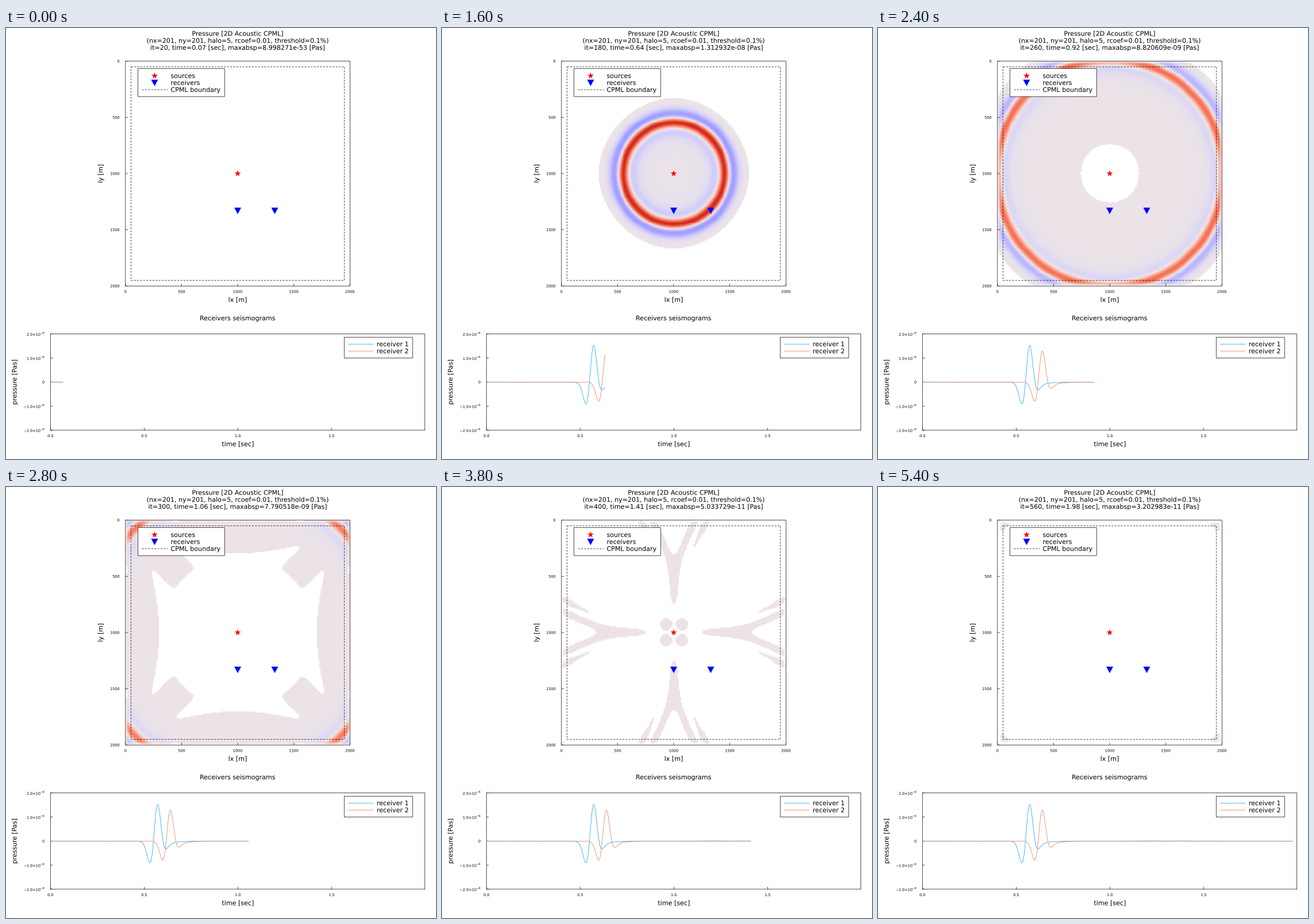
Recreate the animation shown at these times as a matplotlib script. Size 748 px wide and 749 px high, loop 5.6 s.

```python
import numpy as np
import matplotlib.pyplot as plt
from matplotlib.animation import FuncAnimation
from matplotlib.colors import LinearSegmentedColormap
from matplotlib.patches import PathPatch, Polygon, Rectangle
from matplotlib.textpath import TextPath
from matplotlib.transforms import Affine2D

W, H, DPI = 748, 749, 100
PX = 72 / DPI  # points per pixel
plt.rcParams["font.family"] = "DejaVu Sans"

# ---- acoustic wave simulation with absorbing layers ----
N, HALO, DX, VEL = 201, 5, 10.0, 2000.0
F0, T0, RCOEF = 10.0, 0.4, 0.01
DT = DX / (VEL * np.sqrt(2))
STEP, FRAMES = 20, 28
PMAX = 2e-8
MID, REC = 100, 133


def ricker(t):
    a2 = (np.pi * F0 * (t - T0)) ** 2
    return (1 - 2 * a2) * np.exp(-a2)


def absorb(pos):
    """Recursive CPML coefficients (a, b) at grid positions."""
    depth = np.clip(1 - np.minimum(pos, N - 1 - pos) / HALO, 0, 1)
    d = -3 * VEL * np.log(RCOEF) / (2 * HALO * DX) * depth ** 2
    alpha = np.pi * F0 * (1 - depth)
    b = np.exp(-(d + alpha) * DT)
    return (d * (b - 1) / (d + alpha))[:, None], b[:, None]


def simulate():
    a_half, b_half = absorb(np.arange(N - 1) + 0.5)
    a_in, b_in = absorb(np.arange(1, N - 1))
    p, old = np.zeros((N, N)), np.zeros((N, N))
    psi, xi = np.zeros((N - 1, N)), np.zeros((N - 2, N))
    fields, traces = [], []
    for it in range(STEP * FRAMES):
        grad = np.diff(p, axis=0) / DX
        psi = b_half * psi + a_half * grad
        lap = np.diff(grad + psi, axis=0) / DX
        xi = b_in * xi + a_in * lap
        acc = (lap + xi)[:, 1:-1]
        new = np.zeros((N, N))
        # the field is symmetric, so the y part is the transposed x part
        new[1:-1, 1:-1] = (2 * p - old)[1:-1, 1:-1] + (VEL * DT) ** 2 * (acc + acc.T)
        new[MID, MID] += DT ** 2 * ricker(it * DT) / DX ** 2
        old, p = p, new
        traces.append((p[REC, MID], p[REC, REC]))
        if (it + 1) % STEP == 0:
            fields.append(p)
    return fields, np.array(traces)


fields, traces = simulate()
times = np.arange(len(traces)) * DT

# ---- stage in pixel coordinates ----
fig = plt.figure(figsize=(W / DPI, H / DPI), dpi=DPI, facecolor="white")
ax = fig.add_axes([0, 0, 1, 1])
ax.set_xlim(0, W)
ax.set_ylim(H, 0)
ax.axis("off")

BIG, SMALL, TINY = 11.1, 6.5, 4.7
THIN = 0.7
L, R, T, B = 207.8, 598.3, 57.6, 448.3      # map frame
SL, SR, ST, SB = 77.3, 728.7, 531.7, 698.9  # seismogram frame
CX, ZERO = (L + R) / 2, (ST + SB) / 2


def mx(m):
    return L + m * (R - L) / 2000


def my(m):
    return T + m * (B - T) / 2000


def sx(t):
    return SL + t * (SR - SL) / (565 * DT)


def sy(p):
    return ZERO - p * (SB - ST) / (2 * PMAX)


def glyphs(x, y, s, size=BIG, ha="center", rot=0):
    """Unhinted text outline with its baseline at (x, y)."""
    path = TextPath((0, 0), s, size=size)
    ink = path.get_extents()
    dx = {"left": 0, "center": (ink.x0 + ink.x1) / 2, "right": ink.x1}[ha]
    place = Affine2D().translate(-dx, 0).scale(1, -1).rotate_deg(-rot).translate(x, y)
    return place.transform_path(path)


def label(*args, **kw):
    return ax.add_patch(PathPatch(glyphs(*args, **kw), fc="black", ec="none",
                                  snap=False, zorder=8))


def box(x0, y0, x1, y1, z=4, **kw):
    style = dict(fc="none", ec="black", lw=THIN * PX, snap=False) | kw
    return ax.add_patch(Rectangle((x0, y0), x1 - x0, y1 - y0, zorder=z, **style))


def line(xs, ys, color="black", z=4, **kw):
    return ax.plot(xs, ys, color=color, lw=THIN * PX, zorder=z, snap=False,
                   solid_capstyle="butt", dash_capstyle="butt", **kw)[0]


def shape(points, color, z):
    ax.add_patch(Polygon(points, fc=color, ec="none", snap=False, zorder=z))


def star(x, y, r=5.7, z=6):
    ang = np.arange(10) * np.pi / 5
    rad = np.where(np.arange(10) % 2, 0.4 * r, r)
    shape(np.c_[x + rad * np.sin(ang), y - rad * np.cos(ang)], "red", z)


def triangle(x, y, r=6, z=6):
    shape([(x - r, y - 0.87 * r), (x + r, y - 0.87 * r), (x, y + r)], "blue", z)


DASH = dict(ls=(0, (4.6, 3.1)))

# pressure map
stops = [(-1, "#172975"), (-0.73, "#4842e8"), (-0.37, "#a09bff"),
         (-0.2, "#c8c4fd"), (-0.08, "#dfdaf3"), (0, "#ede4e8"),
         (0.08, "#f6d7d0"), (0.22, "#faaf9b"), (0.44, "#f47058"),
         (0.55, "#e44c38"), (0.656, "#cf2a20"), (0.73, "#ba1218"), (1, "#680013")]
cmap = LinearSegmentedColormap.from_list("bwr_lab", [((v + 1) / 2, c) for v, c in stops])
heat = ax.imshow(np.full((N, N), np.nan), cmap=cmap, vmin=-PMAX, vmax=PMAX,
                 extent=(mx(-5), mx(2005), my(2005), my(-5)),
                 interpolation="nearest", aspect="auto", zorder=1)
heat.set_clip_path(Rectangle((L, T), R - L, B - T, transform=ax.transData))

box(L, T, R, B)
box(mx(50), my(50), mx(1950), my(1950), z=3, **DASH)
for m in range(0, 2001, 500):
    line([mx(m)] * 2, [B, B - 4])
    line([L, L + 4], [my(m)] * 2)
    label(mx(m), 460.4, str(m), SMALL)
    label(197.2, my(m) + 2.4, str(m), SMALL, ha="right")
label(CX, 475.9, "lx [m]")
label(168.3, (T + B) / 2, "ly [m]", rot=90)

star(mx(1000), my(1000))
triangle(mx(1000), my(1330))
triangle(mx(1330), my(1330))

box(229.5, 70.5, 380.3, 119.2, z=7, fc="white")
star(258.5, 83, z=8)
triangle(258.5, 95, z=8)
line([236.5, 281.5], [107.2, 107.2], z=8, **DASH)
for i, s in enumerate(("sources", "receivers", "CPML boundary")):
    label(286.5, 86.9 + 12.1 * i, s, ha="left")

label(CX, 13.5, "Pressure [2D Acoustic CPML]")
label(CX, 25.7, "(nx=201, ny=201, halo=5, rcoef=0.01, threshold=0.1%)")
status = label(CX, 37.9, "it=0")

# seismograms
box(SL, ST, SR, SB)
for t in (0.0, 0.5, 1.0, 1.5):
    line([sx(t)] * 2, [SB, SB - 4])
    label(sx(t), 711, str(t), SMALL)
for v in (-2, -1, 0, 1, 2):
    y = sy(v * 1e-8)
    line([SL, SL + 4], [y, y])
    if v:
        label(59.6, y + 3.2, f"{v:.1f}×10".replace("-", "−"), SMALL, ha="right")
        label(59.8, y - 0.2, "−8", TINY, ha="left")
    else:
        label(66.7, y + 2.4, "0", SMALL, ha="right")
label(CX, 508, "Receivers seismograms")
label(CX, 726.7, "time [sec]")
label(18.5, ZERO, "pressure [Pas]", rot=90)

box(588.3, 537.3, 707.3, 573.6, z=7, fc="white")
curves = []
for i, color in enumerate(("#009afa", "#e36f47")):
    y = 549.3 + 12.2 * i
    line([595, 639.5], [y, y], color, z=8)
    label(644.8, y + 3.8, f"receiver {i + 1}", ha="left")
    curves.append(line([], [], color, z=5))


def draw(k):
    p, it = fields[k], STEP * (k + 1)
    heat.set_data(np.where(np.abs(p) > 0.001 * PMAX, p, np.nan))
    status.set_path(glyphs(CX, 37.9, f"it={it}, time={round(float(it * DT), 2)} [sec], "
                                     f"maxabsp={np.abs(p).max():e} [Pas]"))
    for curve, trace in zip(curves, traces.T):
        curve.set_data(sx(times[:it]), sy(trace[:it]))
    return [heat, status, *curves]


anim = FuncAnimation(fig, draw, frames=FRAMES, interval=200, repeat=True, blit=False)
plt.show()
```
